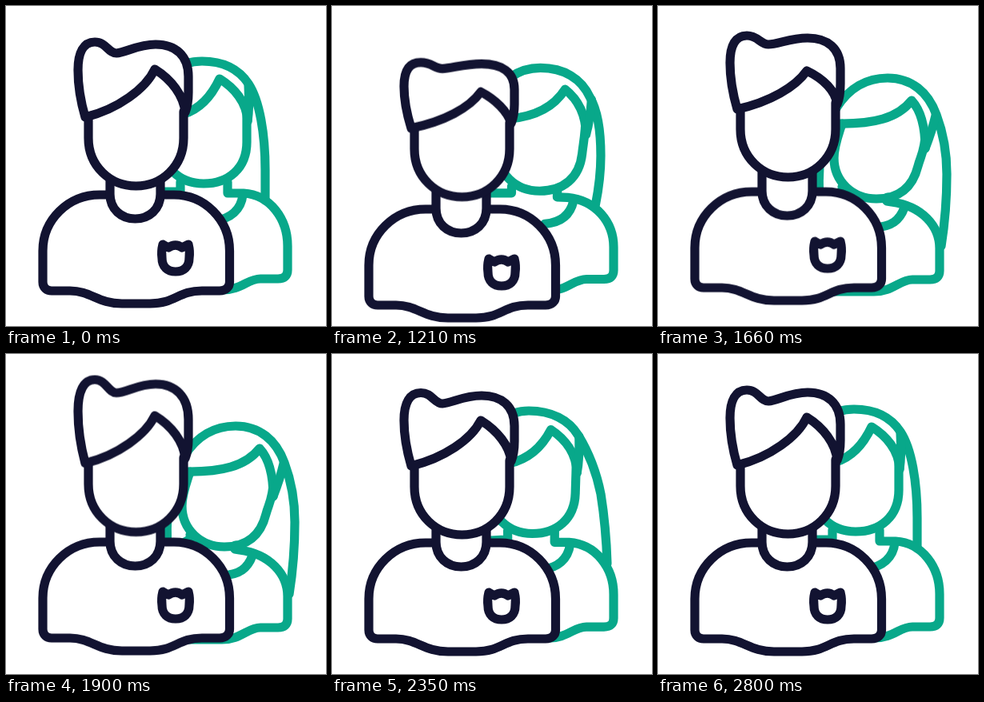
Animation, 400 px wide and 400 px high, one loop 2.83 s. Source, as an HTML page without scripts:

```html
<!DOCTYPE html>
<html lang="en">
<head>
<meta charset="utf-8">
<title>Two people</title>
<style>
html, body { margin: 0; width: 100%; height: 100%; overflow: hidden; background: #fff; }
svg { display: block; width: 100%; height: 100%; }
path { stroke-width: 11.2; stroke-linecap: round; stroke-linejoin: round; }
.man path { fill: #fff; stroke: #121331; }
.man .brow { stroke: none; }
.woman path { fill: none; stroke: #08a88a; }

.torso, .head, .hair, .woman path { animation: 2.83s ease-in-out infinite; }
.torso { animation-name: torso; }
.head { animation-name: head; }
.hair { animation-name: hair; }
.woman .locks { animation-name: locks; }
.woman .face { animation-name: face; }
.woman .fringe { animation-name: fringe; }
.woman .strand { animation-name: strand; }
.woman .neck { animation-name: neck; }
.woman .body { animation-name: body; }
.woman .collar { animation-name: collar; }

@keyframes torso {
  0%, 36.3% { transform: none; }
  36.4% { transform: translateY(1px); }
  43.1% { transform: translateY(18px); }
  59.7% { transform: translateY(-4px); }
  67.1% { transform: translateY(-1px); animation-timing-function: ease-out; }
  73%, 100% { transform: none; }
}
@keyframes head {
  0%, 36.3% { transform: none; }
  36.4% { transform: translateY(-1px); }
  38.5% { transform: translateY(-5px); }
  46% { transform: translateY(25px); animation-timing-function: ease-in; }
  50.2% { transform: translateY(20.5px); animation-timing-function: ease-out; }
  58.7% { transform: translateY(-11px); }
  61.8% { transform: translateY(-8px); animation-timing-function: ease-out; }
  67.1% { transform: translateY(-2.5px); animation-timing-function: ease-out; }
  74% { transform: none; }
  83% { transform: translateY(1px); }
  92.6%, 100% { transform: none; }
}
@keyframes hair {
  0%, 38.5%, 74%, 92.6%, 100% {
    d: path("M99 139C92 115 90 95 90 80C90 58 97 45 111 45C125 45 128 59 138 59C150 58 165 48 187 48C212 48 228 62 228 88L228 108C228 120 226 128 224 133C222 112 207 92 186 79C175 103 140 129 99 139Z");
  }
  46%, 50.2% {
    d: path("M99 139C92 118 90 105 90 91C90 72 97 64 111 64C125 64 128 68 138 68C150 68 165 65 187 65C212 65 228 73 228 92L228 110C228 120 226 128 224 133C218 122 203 110 186 102.5C170 120 140 132 99 139Z");
  }
  58.7% {
    d: path("M99 140C92 116 90 97 90 82C90 60 97 48 111 48C125 48 128 59 138 59C150 59 165 51 187 51C212 51 228 64 228 89L228 108C228 120 226 129 224 134C222 117 207 102 186 92C172 112 140 131 99 140Z");
  }
  61.8%, 67.1% {
    d: path("M99 139C92 113 90 91 90 74C90 49 97 34.5 111 34.5C125 34.5 128 51 138 51C150 51 165 40 187 40C212 40 228 56 228 84L228 108C228 120 226 128 224 133C222 112 207 92 186 79.5C175 103 140 129 99 139Z");
  }
  83% {
    d: path("M99 139C92 115 90 96 90 82C90 60 97 47.5 111 47.5C125 47.5 128 61 138 61C150 60 165 51 187 51C212 51 228 64 228 89L228 108C228 120 226 128 224 133C222 114 207 95 186 82C174 106 140 129 99 139Z");
  }
}
@keyframes locks {
  0%, 36.3%, 93%, 100% {
    d: path("M175 245C170 140 185 69 245 69C272 69 291 79 303 97C317 118 324 160 324 205C324 220 324 232 324 243");
  }
  50.2% {
    d: path("M190 245C185 150 225 88 280 88C312 88 338 105 347 136C350 145 351 155 351 165C351 195 345 225 336 256");
    animation-timing-function: ease-out;
  }
  58.7%, 67.1%, 72% {
    d: path("M201.5 235C198 140 235 90 287 90C317 90 338 108 348 136C357 160 361 185 361 210C361 245 358 275 354 300");
  }
  62% {
    d: path("M201.5 235C198 140 235 90 288 90C318 90 339 108 349 136C359 160 363 185 363 210C363 247 359 275 354 300");
  }
  83% {
    d: path("M180 245C180 140 190 71 246 71C274 71 296 82 308 102C322 125 331 150 336 175C340 200 343 230 344 262");
  }
}
@keyframes face {
  0%, 36%, 87%, 100% {
    d: path("M301 118C301 138 301 155 301 170C301 203 278 222 247 222C216 222 194 200 194 170C194 155 194 145 194 130");
  }
  49.8%, 71.5% {
    d: path("M334 160C334 180 328 188 325 200C318 228 300 241 273 241C244 241 220 220 220 190C220 175 226 160 230 147");
  }
}
@keyframes fringe {
  0%, 36%, 87%, 100% { d: path("M222 135C245 128 259 108 267 91C285 102 301 120 302 144"); }
  49.8%, 71.5% { d: path("M222 147C270 148 300 140 317 118C328 130 334 148 334 178"); }
}
@keyframes strand {
  0%, 36%, 87%, 100% { d: path("M303 98C304 115 304 130 302 144"); }
  49.8%, 71.5% { d: path("M347 137C344 150 341 160 334 178"); }
}
@keyframes neck {
  0%, 36%, 87%, 100% { d: path("M218 220L218 232L196 232"); }
  50.2% { d: path("M232 232L232 236L196 236"); }
  58.7%, 71.5% { d: path("M230 226L231 231L215 240"); }
}
@keyframes body {
  0%, 36%, 87%, 100% {
    d: path("M277 220L277 234L297 234C330 236 352 266 352 300L352 330C352 337 348 341 340 341L318 341C302 341 294 355 270 355L200 355");
  }
  49.8%, 71.5% {
    d: path("M287 239L286 244L292 245C330 250 352 275 352 303L352 331C352 338 348 342 340 342L318 342C302 342 294 357 270 357L200 357");
  }
}
@keyframes collar {
  0%, 36%, 87%, 100% { d: path("M296 236C294 255 280 266 262 268"); }
  49.8%, 71.5% { d: path("M308 252C302 268 292 276 270 277"); }
}
</style>
</head>
<body>
<svg viewBox="0 0 400 400">
  <g class="woman">
    <path class="locks" d="M175 245C170 140 185 69 245 69C272 69 291 79 303 97C317 118 324 160 324 205C324 220 324 232 324 243"/>
    <path class="neck" d="M218 220L218 232L196 232"/>
    <path class="body" d="M277 220L277 234L297 234C330 236 352 266 352 300L352 330C352 337 348 341 340 341L318 341C302 341 294 355 270 355L200 355"/>
    <path class="collar" d="M296 236C294 255 280 266 262 268"/>
    <path class="face" d="M301 118C301 138 301 155 301 170C301 203 278 222 247 222C216 222 194 200 194 170C194 155 194 145 194 130"/>
    <path class="fringe" d="M222 135C245 128 259 108 267 91C285 102 301 120 302 144"/>
    <path class="strand" d="M303 98C304 115 304 130 302 144"/>
  </g>
  <g class="man">
    <g class="torso">
      <path d="M130 236H117C78 236 46 267 46 306V345C46 352 51 356 57 356H80C106 356 115 372 145 372H180C212 372 215 356 245 356H267C275 356 279.500 351 279.500 345V306C279.500 267 248 236 210 236H193"/>
      <path d="M130 195V235C130 254 144 266 161.500 266S193 254 193 235V195"/>
      <path d="M195 315C194 308 195 302 196 298L203 302Q212 296 220 302L228 298C229 302 230 308 229 315C229 326 222 332 212 332S195 326 195 315Z"/>
    </g>
    <g class="head">
      <path class="brow" d="M103 139L160 80H222V140Z"/>
      <path d="M103 139V165C103 200 130 225 162.500 225S222 200 222 165V132"/>
      <path class="hair" d="M99 139C92 115 90 95 90 80C90 58 97 45 111 45C125 45 128 59 138 59C150 58 165 48 187 48C212 48 228 62 228 88L228 108C228 120 226 128 224 133C222 112 207 92 186 79C175 103 140 129 99 139Z"/>
    </g>
  </g>
</svg>
</body>
</html>
```
